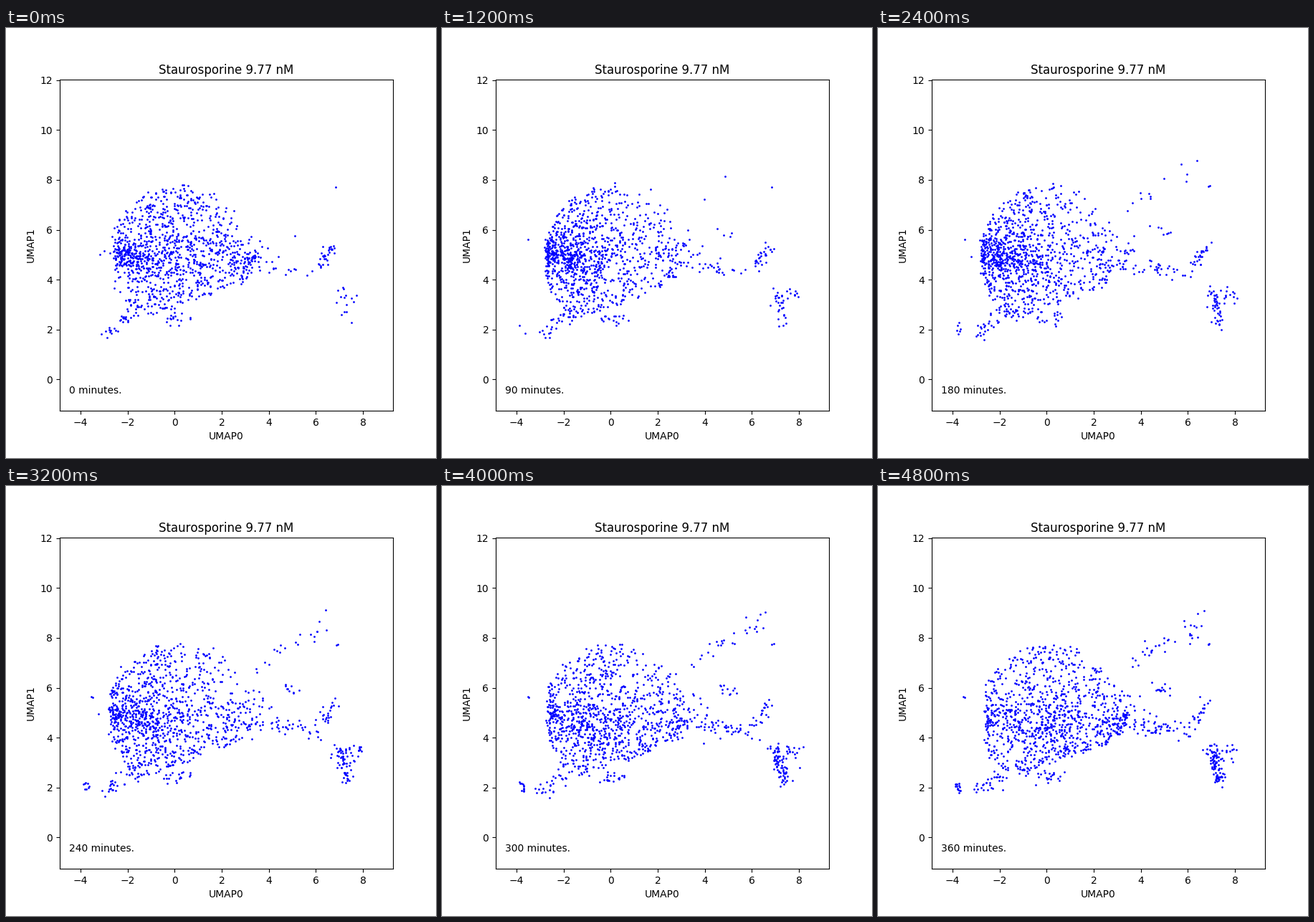
A matplotlib script for the animation above (5200 ms loop, 600 by 600 pixels).

```python
import numpy as np
import matplotlib.pyplot as plt
from matplotlib.animation import FuncAnimation

STEPS = 13
STEP_MS = 400
BLOB_CELLS = 930
rng = np.random.default_rng(7)


def walk(n, size):
    """Random walks in [0, 1], folded back at the ends."""
    moves = rng.normal(0, size, (STEPS, n))
    moves[0] = rng.random(n)
    pos = np.cumsum(moves, axis=0) % 2
    return np.where(pos > 1, 2 - pos, pos)


def bell(u):
    """Draw evenly spread values in [0, 1] towards the middle."""
    return u + .06 * np.sin(2 * np.pi * u)


def blob():
    """Main population: crowds to the left, then spreads out again."""
    across, up = bell(walk(BLOB_CELLS, .07)), bell(walk(BLOB_CELLS, .07))
    path = []
    for step in range(STEPS):
        t = step / (STEPS - 1)
        crowd = np.sin(np.pi * t ** .7)
        left, right = -2.6 - .15 * crowd, 3.4 - .8 * crowd
        x = left + (right - left) * across[step] ** (1.2 + .4 * crowd)
        bulge = 2.9 * np.sqrt(np.clip(1 - ((x - .2) / 3.05) ** 2, 0, 1))
        floor = np.maximum(4.9 - bulge, 2.9 + .36 * x)
        height = up[step] ** (1.15 + .13 * x + .25 * t)
        y = floor + (4.9 + bulge - floor) * height
        path.append(np.array([x, y]) + rng.normal(0, .06, (2, BLOB_CELLS)))
    return path


def island(start, end, first, last, scatter=.14):
    """Cells strewn along a line; their number goes from first to last."""
    n = int(max(first, last))
    start, end = np.array([start, end])[:, :, None]
    along = walk(n, .12)
    base = rng.normal(0, .8, (2, n))
    path = []
    for step in range(STEPS):
        live = max(0, int(first + (last - first) * step / (STEPS - 1)))
        drift = scatter * (base + rng.normal(0, .6, (2, n)))
        path.append((start + (end - start) * along[step] + drift)[:, :live])
    return path


paths = [
    blob(),
    # left side
    island((-2.3, 5.1), (-1.3, 4.6), 140, 30, .35),
    island((-3.0, 1.85), (-1.5, 2.8), 32, 34, .18),
    island((-3.85, 2.25), (-3.7, 1.8), -2, 14, .05),
    island((-.4, 2.4), (.6, 2.5), 16, 20),
    island((-3.53, 5.65), (-3.47, 5.6), .9, 2.9, .01),
    # bridge to the right
    island((2.4, 4.6), (6.2, 4.3), 24, 78, .17),
    island((2.2, 5.9), (3.7, 5.1), 20, 36, .42),
    island((6.2, 4.6), (6.7, 5.4), 28, 20),
    island((6.9, 3.7), (7.4, 2.2), 8, 78),
    island((7.0, 3.3), (8.0, 3.5), 7, 24, .2),
    # upper right
    island((3.6, 6.9), (5.2, 7.9), -3, 20, .2),
    island((4.4, 6.15), (5.1, 5.75), 1, 13),
    island((5.9, 7.7), (6.3, 9.2), -6, 15, .25),
    island((6.83, 7.72), (6.95, 7.76), 1, 3, .02),
]
cells = [np.hstack(parts) for parts in zip(*paths)]

plt.rcParams["text.kerning_factor"] = 6
fig, ax = plt.subplots(figsize=(6, 6), dpi=100)
ax.set_xlim(-4.89, 9.28)
ax.set_ylim(-1.25, 12.018)
ax.set_title("Staurosporine 9.77 nM")
ax.set_xlabel("UMAP0")
ax.set_ylabel("UMAP1")
dots, = ax.plot([], [], "bo", markersize=1)
label = ax.text(-4.5, -.56, "")


def update(step):
    dots.set_data(*cells[step])
    label.set_text(f"{30 * step} minutes.")
    return dots, label


anim = FuncAnimation(fig, update, frames=STEPS, interval=STEP_MS,
                     init_func=lambda: update(0), repeat=True, repeat_delay=0)
plt.show()
```
